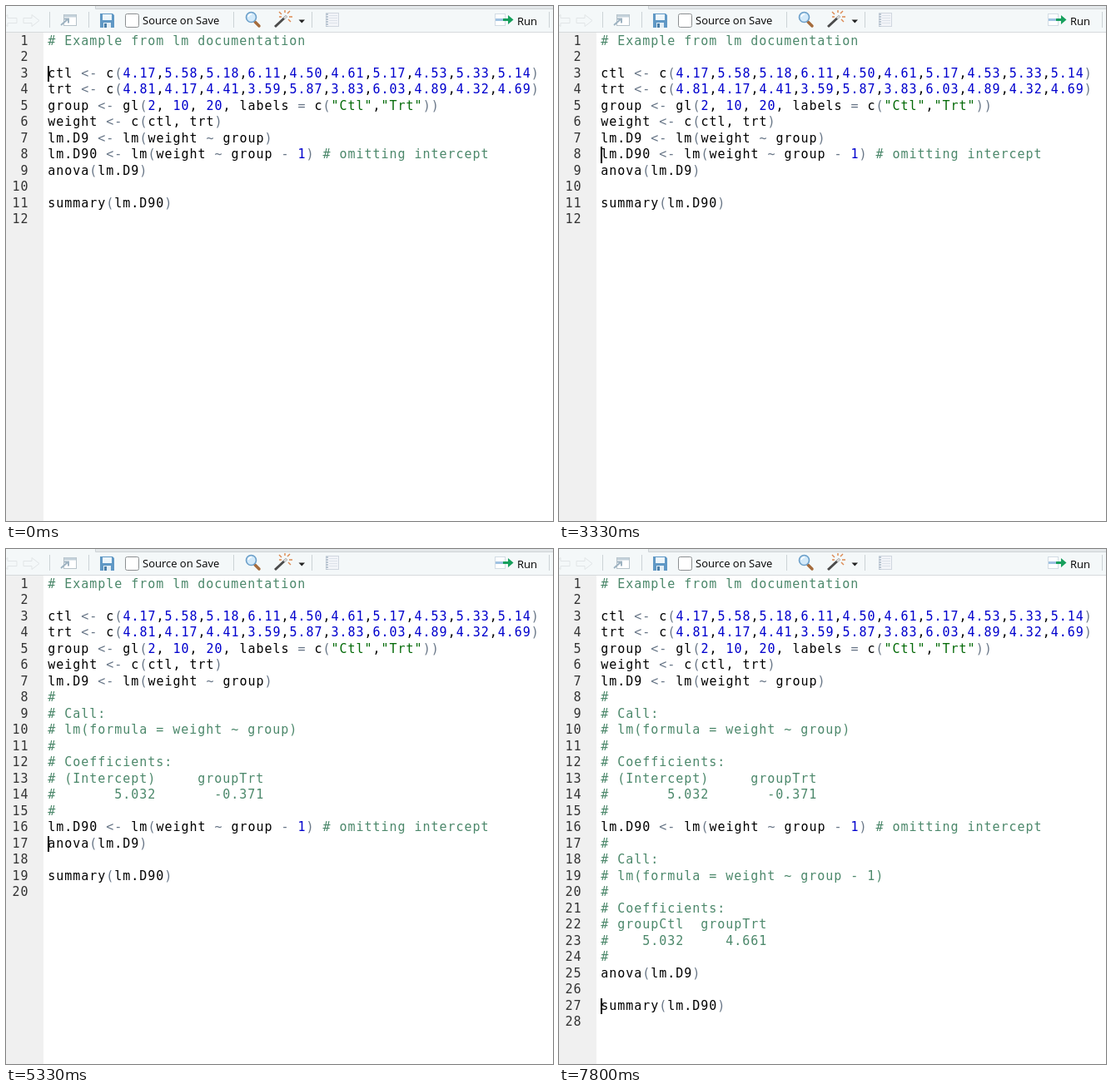
Write an HTML page that moves like this. It is 657 px wide and 619 px high and loops after 8000 ms.

```html
<!DOCTYPE html>
<html lang="en">
<head>
<meta charset="utf-8">
<title>R script editor</title>
<style>
html, body { margin: 0; width: 100%; height: 100%; overflow: hidden; background: #fff; }
svg { display: block; width: 657px; height: 619px; }
.code text { font: 15px "DejaVu Sans Mono", monospace; letter-spacing: 0.97px; white-space: pre; fill: #000; }
.code .num { fill: #333; text-anchor: end; }
.code .comment { fill: #4c886b; }
.code .string { fill: #036a07; }
.code .number { fill: #0000cd; }
.code .operator { fill: #687687; }
.label { font: 13px "Open Sans", "Noto Sans", sans-serif; fill: #000; }
</style>
</head>
<body>
<svg viewBox="0 0 657 619">
  <rect width="657" height="619" fill="#fff"/>
  <rect y="32" width="45" height="587" fill="#f0f0f0"/>

  <g id="toolbar" fill="none">
    <rect width="657" height="31" fill="#f4f8f9"/>
    <path d="M107 0H657V3H107Z" fill="#e4e8ea"/>
    <path d="M107.500 0V3.500H657" stroke="#cdd3d6"/>
    <path d="M0 31.500H657" stroke="#d6dadc"/>
    <path d="M52.500 7V26M99.500 7V26M273.500 7V26M367.500 7V26M652.500 7V26" stroke="#ccd3d6"/>

    <path d="M-6 17.500L2 10.500V14.500H13V20.500H2V24.500Z M40 17.500L31 10.500V14.500H21V20.500H31V24.500Z" stroke="#e1e5e7"/>

    <rect x="69.500" y="10.500" width="15" height="13" fill="#fff" stroke="#b7c3ca"/>
    <path d="M70 12H84" stroke="#c3d1da" stroke-width="3"/>
    <path d="M66 23L74 16M70 15.500H75V20.500" stroke="#9db2c1" stroke-width="2"/>

    <path d="M113 9H128L130 11V26H113Z" fill="#6098c5"/>
    <rect x="116" y="10" width="11" height="7" fill="#eef6fb"/>
    <rect x="117" y="20" width="9" height="6" fill="#e3eef5"/>
    <rect x="118" y="21" width="3" height="5" fill="#4b7fa9"/>

    <rect x="143.500" y="9.500" width="16" height="16" rx="2" fill="#fff" stroke="#8c8f91"/>

    <path d="M299 19L304 24" stroke="#a56b3c" stroke-width="3.500" stroke-linecap="round"/>
    <circle cx="294.500" cy="13.500" r="6" fill="#d3eafa" stroke="#6b9fc9" stroke-width="1.600"/>
    <path d="M291 13A4 4 0 0 1 295 10" stroke="#fff" stroke-width="1.500"/>

    <path d="M323 25L337 12" stroke="#4b4b4b" stroke-width="3"/>
    <path d="M334 15L337 12" stroke="#d5d5d5" stroke-width="3"/>
    <path d="M328 7L331 10M335 5V8M341 6L338 9M340 13H344M339 16L342 19M328 13H331" stroke="#dc8850" stroke-width="1.400"/>
    <path d="M351.500 16.500H359L355.250 20.500Z" fill="#222"/>

    <rect x="384.500" y="8.500" width="15" height="16" fill="#f2f4f8" stroke="#d0d7df"/>
    <path d="M388 11.500H398M388 14.500H398M388 17.500H398M388 20.500H398" stroke="#dde3ea"/>
    <path d="M385.500 9V25" stroke="#b9c5d1" stroke-width="3" stroke-dasharray="2 1"/>

    <rect x="587.500" y="9.500" width="12" height="14" fill="#fff" stroke="#d2dce4"/>
    <path d="M588 16.500H597" stroke="#9fc2e2" stroke-width="3"/>
    <path d="M597 15H603V11L609.500 16.500L603 22V18H597Z" fill="#17a05d"/>

    <text class="label" x="164" y="22">Source on Save</text>
    <text class="label" x="614" y="23">Run</text>
  </g>

  <rect id="caret" x="50" width="2" fill="#000"/>
</svg>

<script>
const svg = document.querySelector("svg");
const caret = document.getElementById("caret");

const head = `# Example from lm documentation

ctl <- c(4.17,5.58,5.18,6.11,4.50,4.61,5.17,4.53,5.33,5.14)
trt <- c(4.81,4.17,4.41,3.59,5.87,3.83,6.03,4.89,4.32,4.69)
group <- gl(2, 10, 20, labels = c("Ctl","Trt"))
weight <- c(ctl, trt)
lm.D9 <- lm(weight ~ group)
`;
const firstFit = `#
# Call:
# lm(formula = weight ~ group)
#
# Coefficients:
# (Intercept)     groupTrt
#       5.032       -0.371
#
`;
const secondCall = "lm.D90 <- lm(weight ~ group - 1) # omitting intercept\n";
const secondFit = `#
# Call:
# lm(formula = weight ~ group - 1)
#
# Coefficients:
# groupCtl  groupTrt
#    5.032     4.661
#
`;
const tail = "anova(lm.D9)\n\nsummary(lm.D90)\n";

const TOKEN = /#.*|"[^"]*"|[a-z][\w.]*|[\d.]+|[()<~=-]+|[, ]+/gi;
const rowTop = row => Math.floor(33 + 19.5 * row);

function add(parent, tag, attrs, text = "") {
  const el = document.createElementNS("http://www.w3.org/2000/svg", tag);
  for (const key in attrs) el.setAttribute(key, attrs[key]);
  el.textContent = text;
  return parent.appendChild(el);
}

function tokenClass(token) {
  if (token[0] === "#") return "comment";
  if (token[0] === '"') return "string";
  if (/^\d/.test(token)) return "number";
  return /^[()<~=-]/.test(token) ? "operator" : "";
}

function buildPage(source) {
  const page = add(svg, "g", { class: "code" });
  source.split("\n").forEach((line, row) => {
    const y = rowTop(row) + 14;
    add(page, "text", { class: "num", x: 27.5, y }, row + 1);
    const text = add(page, "text", { x: 50.3, y });
    for (const [token] of line.matchAll(TOKEN))
      add(text, "tspan", { class: tokenClass(token) }, token);
  });
  return page;
}

const pages = [
  [0, head + secondCall + tail],
  [4530, head + firstFit + secondCall + tail],
  [6600, head + firstFit + secondCall + secondFit + tail]
].map(([start, source]) => [start, buildPage(source)]);
svg.append(caret);

// [time, caret line]; line 0 hides the caret
const caretSteps = [
  [0, 3], [530, 0], [670, 4], [1530, 5], [2000, 6], [2530, 0], [2670, 7],
  [3200, 0], [3330, 8], [3870, 0], [4270, 8], [4530, 16], [5000, 0],
  [5330, 17], [5870, 0], [6270, 17], [6600, 25], [7000, 0], [7800, 27]
];

const current = (steps, t) => steps.findLast(([start]) => start <= t)[1];

function draw(t) {
  const shown = current(pages, t);
  for (const [, page] of pages) page.style.display = page === shown ? "" : "none";
  const line = current(caretSteps, t);
  const top = rowTop(line - 1);
  caret.setAttribute("y", top);
  caret.setAttribute("height", line ? rowTop(line) - top : 0);
}

function frame() {
  draw(performance.now() % 8000);
  requestAnimationFrame(frame);
}
frame();
</script>
</body>
</html>
```
